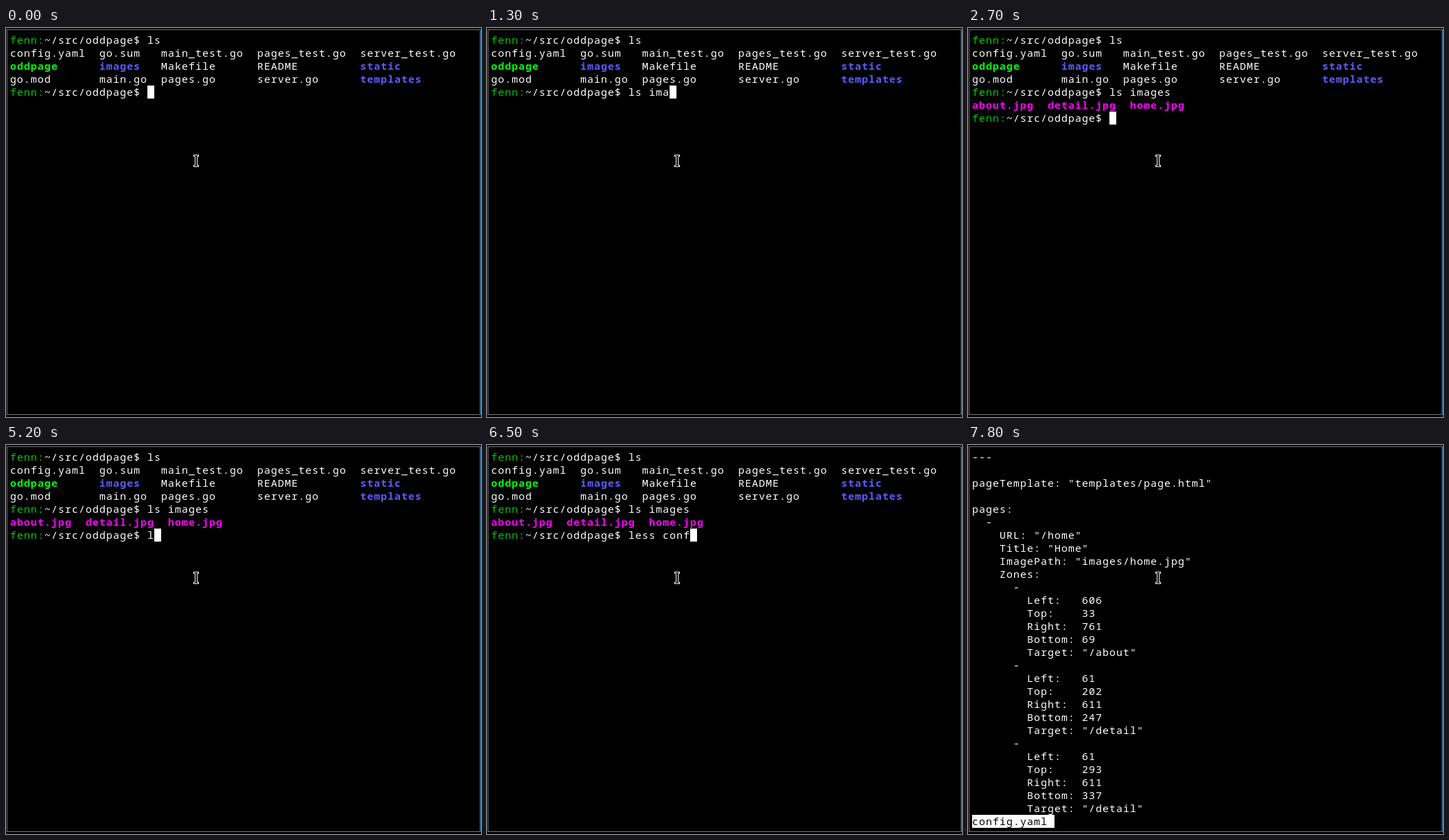
An HTML page for the animation above (8000 ms loop, 692 by 568 pixels).

```html
<!DOCTYPE html>
<html lang="en">
<head>
<meta charset="utf-8">
<title>Terminal session</title>
<style>
  html, body { margin: 0; width: 100%; height: 100%; overflow: hidden; background: #000; }
  #stage { position: relative; width: 692px; height: 568px; overflow: hidden; background: #000; }
  #frame { position: absolute; left: 0; top: 0; }
  pre {
    position: absolute; left: 6px; top: 8px; margin: 0;
    font: 15px/19px "Noto Sans Mono", monospace;
    letter-spacing: calc(10px - 1ch);
    font-variant-ligatures: none;
    color: #fff;
  }
  b { font-weight: 700; }
  .user { color: #00cd00; }
  .exec { color: #00ff00; }
  .dir { color: #5c5cff; }
  .image { color: #ff00ff; }
  .block { position: absolute; height: 19px; background: #fff; }
  #cursor { width: 10px; }
  #status { left: 6px; top: 540px; width: 120px; }
  #lastLine { top: 540px; color: #000; }
  [hidden] { display: none; }
</style>
</head>
<body>
<div id="stage">
  <div id="cursor" class="block"></div>
  <pre id="shell"></pre>
  <div id="pager" hidden>
    <pre id="file"></pre>
    <div id="status" class="block"></div>
    <pre id="lastLine">config.yaml</pre>
  </div>
  <svg id="frame" width="692" height="568" shape-rendering="crispEdges">
    <path d="M1 2.5H691M1.5 2V565M1 564.5H691" fill="none" stroke="#777"/>
    <path d="M691 2V565" stroke="#2b5f85" stroke-width="2"/>
    <path d="M273 185h8v3h-2v12h2v3h-8v-3h2v-12h-2z" fill="#fff"/>
    <path d="M274 186h6v1h-2v14h2v1h-6v-1h2v-14h-2z"/>
  </svg>
</div>
<script>
const LOOP = 8000, LIST_AT = 2700, PAGER_AT = 7800;
const $ = id => document.getElementById(id);
const bold = (kind, text) => `<b class="${kind}">${text}</b>`;
const prompt = '<span class="user">fenn:</span>~/src/oddpage$ ';

const listing = prompt + `ls
config.yaml  go.sum   main_test.go  pages_test.go  server_test.go
${bold('exec', 'oddpage')}      ${bold('dir', 'images')}   Makefile      README         ${bold('dir', 'static')}
go.mod       main.go  pages.go      server.go      ${bold('dir', 'templates')}
`;
const images = ['about', 'detail', 'home'].map(n => bold('image', n + '.jpg')).join('  ');

// Each entry: [time, characters typed so far]
const listCommand = {
  text: 'ls images', row: 4,
  keys: [[500, 1], [700, 2], [900, 3], [1100, 4], [1200, 5], [1300, 6], [1700, 7], [2000, 8], [2500, 9]]
};
const viewCommand = {
  text: 'less config.yaml ', row: 6,
  keys: [[5200, 1], [5300, 2], [5600, 3], [5700, 4], [5900, 5], [6200, 6], [6300, 8],
         [6500, 9], [6600, 10], [6800, 11], [7200, 17]]
};

const zone = (left, top, right, bottom, target) => `      -
        Left:   ${left}
        Top:    ${top}
        Right:  ${right}
        Bottom: ${bottom}
        Target: "/${target}"
`;
$('file').textContent = `---

pageTemplate: "templates/page.html"

pages:
  -
    URL: "/home"
    Title: "Home"
    ImagePath: "images/home.jpg"
    Zones:
` + zone(606, 33, 761, 69, 'about') + zone(61, 202, 611, 247, 'detail') + zone(61, 293, 611, 337, 'detail');

const typedCount = (keys, time) => keys.reduce((n, [at, count]) => time >= at ? count : n, 0);

let shown = '';
function draw(time) {
  const listed = time >= LIST_AT, paging = time >= PAGER_AT;
  const command = listed ? viewCommand : listCommand;
  const count = typedCount(command.keys, time);
  const state = `${listed} ${paging} ${count}`;
  if (state === shown) return;
  shown = state;

  const history = listed ? `${listing}${prompt}${listCommand.text}\n${images}\n` : listing;
  $('shell').innerHTML = history + prompt + command.text.slice(0, count);
  $('cursor').style.left = 206 + 10 * count + 'px';
  $('cursor').style.top = 8 + 19 * command.row + 'px';
  $('shell').hidden = $('cursor').hidden = paging;
  $('pager').hidden = !paging;
}

const start = performance.now();
function tick() {
  draw((performance.now() - start) % LOOP);
  requestAnimationFrame(tick);
}
tick();
</script>
</body>
</html>
```
